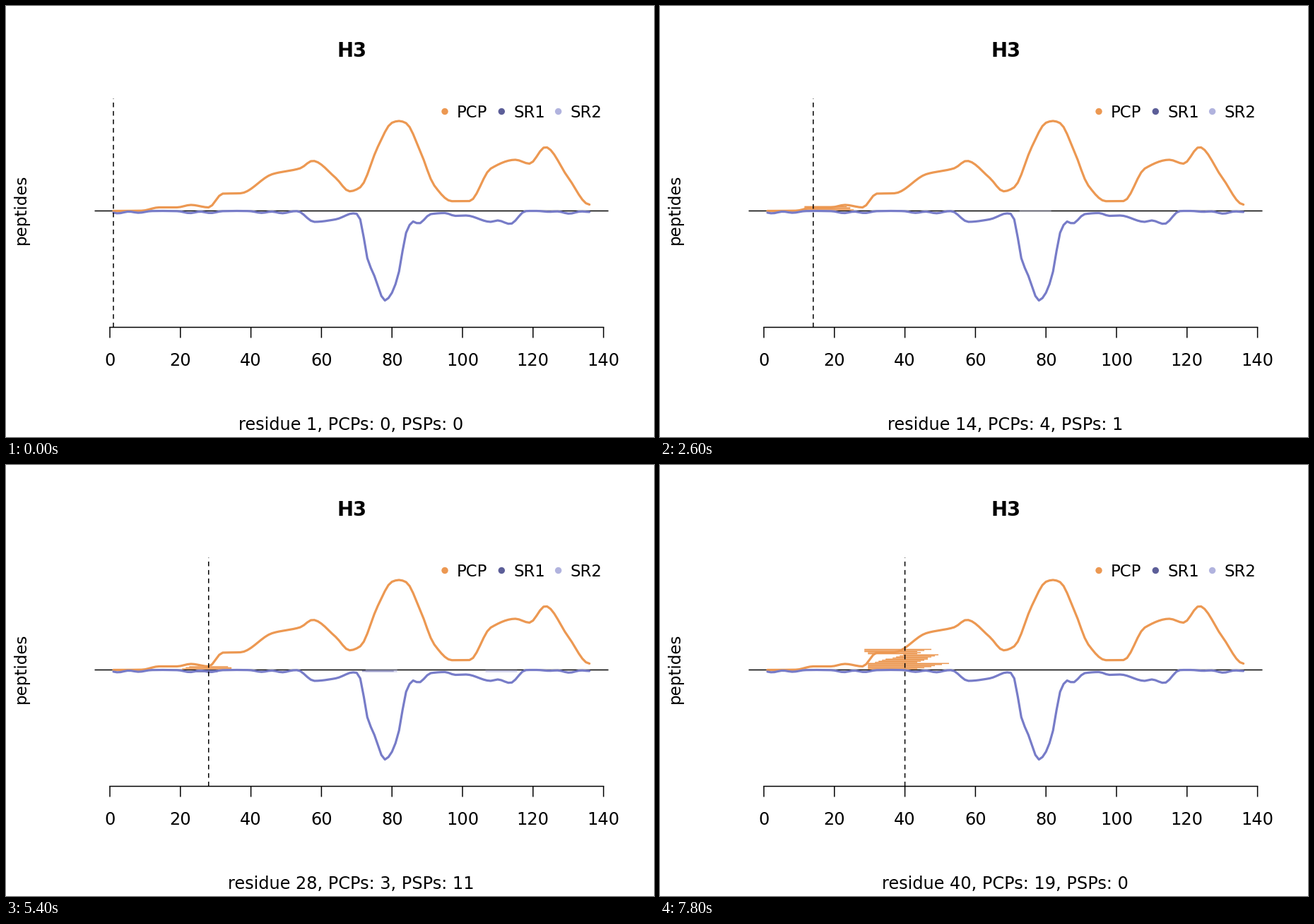
Animation, 917 px wide and 611 px high, one loop 8 s. Source, as a matplotlib script:

```python
import numpy as np
import matplotlib.pyplot as plt
from matplotlib.animation import FuncAnimation
from matplotlib.collections import LineCollection

W, H = 917, 611
BASE, AXIS, TOP = 290.5, 455.5, 131
ORANGE, BLUE = "#ec9852", "#777cc8"
DARK, LIGHT = "#5c5e98", "#b1b3de"
PCP_STEP, PSP_STEP = 1.53, 0.27
RES = np.arange(1, 137)

plt.rcParams["font.family"] = "DejaVu Sans"

# key points (residue, height) of the two coverage profiles
PCP_KEYS = [
    (1, 0), (9, .3), (14, 5), (19, 5), (23, 8.5), (28, 5), (32, 24.5),
    (37, 25), (46, 52), (54, 60.5), (57.5, 71), (64, 47), (68, 27.8),
    (71, 33.5), (76, 91), (80, 125), (82, 127.5), (84, 124.5), (88, 85),
    (92, 36), (97, 13.8), (102, 14), (108, 60), (115, 72.5), (119, 67),
    (123.5, 90.5), (130, 47), (136, 9),
]
PSP_KEYS = [
    (53, 0), (58, 15.5), (64, 12), (69.5, 2.8), (71, 12), (73, 67),
    (75, 92), (78, 127), (80, 116), (82, 86), (84, 31), (86, 15),
    (87.5, 18), (91, 4.5), (95, 3), (98, 7), (101, 6.5), (108, 15.5),
    (110, 13.5), (113.5, 18.5), (118, 0),
]

# peptide families in stacking order: first and last start,
# first and last end, number of peptides
PCP_FAMILIES = [
    (30, 30, 43, 52, 6), (21, 23, 34, 33, 3), (12, 12, 25, 23, 4),
    (32, 40, 43, 49, 8), (30, 30, 43, 44, 2), (29, 29, 43, 47, 3),
]
# spliced families: start, end, number of peptides
PSP_FAMILIES = [
    (2, 5, 10), (6, 9, 15), (10, 11, 3), (13, 14, 1), (15, 17, 8),
    (20, 23, 9), (25, 30, 11), (33, 35, 2), (38, 39, 1),
]
# where the other half of a spliced peptide lies, taken in turn
PARTNERS = [(73, 81, DARK, LIGHT), (107, 115, DARK, LIGHT),
            (72, 80, LIGHT, DARK)]


def px(residue):
    return 147 + 4.99 * residue


def smooth(keys):
    """Monotone cubic through the key points, sampled at every residue."""
    x, y = np.array(keys, float).T
    h = np.diff(x)
    d = np.diff(y) / h
    left, right = d[:-1], d[1:]
    same = left * right > 0
    m = np.zeros_like(x)
    m[1:-1] = np.where(same, 2 * left * right
                       / np.where(same, left + right, 1), 0)
    i = np.clip(np.searchsorted(x, RES, side="right") - 1, 0, len(h) - 1)
    t = np.clip((RES - x[i]) / h[i], 0, 1)
    return (y[i] * (1 + 2 * t) * (1 - t) ** 2
            + m[i] * h[i] * t * (1 - t) ** 2
            + y[i + 1] * t ** 2 * (3 - 2 * t)
            + m[i + 1] * h[i] * t ** 2 * (t - 1))


def ripple():
    """Low waves of the sparse regions, swelling and fading."""
    swell = .5 - .5 * np.cos(2 * np.pi * (RES - 15) / 21)
    wave = 1 + .6 * np.cos(2 * np.pi * (RES - 2) / 6.75)
    return 2.4 * swell * wave


def family(s0, s1, e0, e1, n):
    return zip(np.linspace(s0, s1, n).round(), np.linspace(e0, e1, n).round())


PCPS = [p for f in PCP_FAMILIES for p in family(*f)]
PSPS = [(a, b, *PARTNERS[k % 3]) for a, b, n in PSP_FAMILIES for k in range(n)]


def covering(peptides, residue):
    return [p for p in peptides if p[0] <= residue <= p[1]]


def bar(start, end, y):
    return [(px(start - .5), y), (px(end + .5), y)]


fig = plt.figure(figsize=(W / 72, H / 72), dpi=72, facecolor="white")
ax = fig.add_axes([0, 0, 1, 1])
ax.set_xlim(0, W)
ax.set_ylim(H, 0)
ax.axis("off")


def stroke(x, y, color="black", lw=1.5, **kw):
    kw = {"solid_capstyle": "butt", "snap": False, **kw}
    return ax.plot(x, y, color=color, lw=lw, **kw)[0]


def label(x, y, text, size=24, **kw):
    kw = {"ha": "center", "va": "baseline", **kw}
    return ax.text(x, y, text, fontsize=size, color="black", **kw)


def bar_layer(lw, **kw):
    layer = LineCollection([], linewidths=lw, zorder=3, **kw)
    layer.set_snap(False)
    ax.add_collection(layer, autolim=False)
    return layer


label(489.5, 72.5, "H3", 27.5, weight="bold")
label(32.5, 288.5, "peptides", 23, rotation=90, ha="right", va="center")

stroke([125.5, 852.5], [BASE, BASE], zorder=2)
stroke([px(0), px(140)], [AXIS, AXIS], solid_capstyle="projecting")
for v in range(0, 141, 20):
    stroke([px(v)] * 2, [AXIS, 470.5])
    label(px(v), 510, str(v))

for k, (name, color) in enumerate([("PCP", ORANGE), ("SR1", DARK),
                                   ("SR2", LIGHT)]):
    x = 621 + 80.3 * k
    ax.add_patch(plt.Circle((x, 149.5), 4.7, color=color, lw=0))
    label(x + 17, 157.5, name, 22.8, ha="left")

pcp_height = smooth(PCP_KEYS)
psp_height = np.maximum(smooth(PSP_KEYS), ripple())
for height, color, z in [(-pcp_height, ORANGE, 4), (psp_height, BLUE, 5)]:
    stroke(px(RES), BASE + height, color, 3.2, zorder=z,
           solid_joinstyle="round", solid_capstyle="round")

pcp_lines = bar_layer(1.5, colors=ORANGE)
psp_lines = bar_layer(.5)
cursor = stroke([0, 0], [AXIS, TOP], zorder=6, linestyle=(0, (4.4, 3.6)),
                dash_capstyle="butt")
caption = label(488.5, 601.5, "")


def update(i):
    residue = i + 1
    pcps, psps = covering(PCPS, residue), covering(PSPS, residue)
    pcp_lines.set_segments([bar(a, b, BASE - PCP_STEP * k)
                            for k, (a, b) in enumerate(pcps, 1)])
    segs, colors = [], []
    for k, (a, b, c, d, near, far) in enumerate(psps, 1):
        y = BASE + PSP_STEP * k
        segs += [bar(a, b, y), bar(c, d, y)]
        colors += [near, far]
    psp_lines.set_segments(segs)
    psp_lines.set_color(colors)
    cursor.set_xdata([px(residue)] * 2)
    caption.set_text(
        f"residue {residue}, PCPs: {len(pcps)}, PSPs: {len(psps)}")
    return pcp_lines, psp_lines, cursor, caption


anim = FuncAnimation(fig, update, frames=40, interval=200, repeat=True,
                     repeat_delay=0, blit=False)
plt.show()
```
